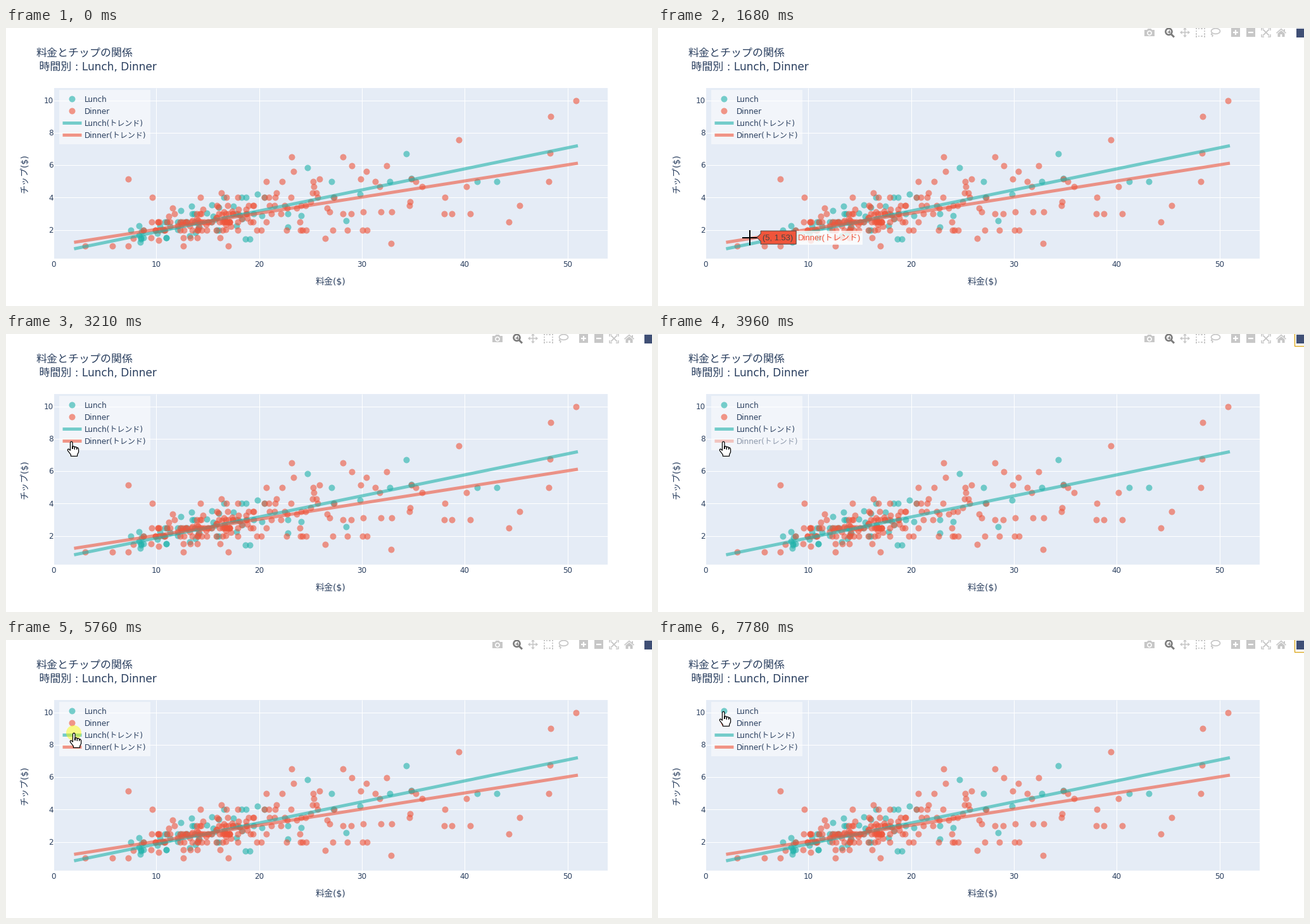
A matplotlib script that plays this animation: 1020x440 px, repeating every 8 s.

```python
import numpy as np
import matplotlib.pyplot as plt
from matplotlib.animation import FuncAnimation
from matplotlib.patches import Circle, Polygon, Rectangle

W, H, STEP, LOOP = 1020, 440, 50, 8000
DPI = 80
PT = 72 / DPI  # points per pixel
TEAL, RED, INK = "#20b2aa", "#ef553b", "#2a3f5f"
GREY, DARK = "#c7c7c7", "#7c7c7c"
SANS = ["DejaVu Sans", "Noto Sans CJK JP"]
ARIAL = ["Liberation Sans", "Noto Sans CJK JP"]

# Isolated points as tip: bills
DINNER = {
    1: [3.07, 5.75, 7.25, 12.6, 17], 1.17: [32.83], 1.47: [26.41, 7.74],
    2: [8.77, 30.46, 30.06, 28.55, 27.18, 24.55, 24.2, 24.01, 22.67, 20.23, 19.77, 17.9],
    2.5: [44.3, 23.95, 10.3, 20.7],
    3: [40.55, 38.73, 38.01, 28.97, 28.15, 22.12, 21.16],
    3.12: [32.9, 31.85, 30.14, 26.87], 3.35: [26.59, 23.68, 22.75, 11.61],
    3.52: [45.35, 34.63, 24.5, 24.06, 22.49, 21.5, 21, 19.49],
    3.72: [25, 34.65],
    4: [38.07, 27.28, 25.71, 23.1, 21.58, 20.53, 20.92, 17.9, 16.8, 14.31, 9.6],
    4.3: [25.56, 25.21, 21.7, 16.32], 4.68: [40.17, 35.83, 31.71, 25.29],
    5: [48.17, 35.26, 31.27, 25.28, 22.23, 20.69],
    5.14: [34.81, 29.9, 25.89, 7.25], 5.62: [30.4, 23.33], 5.96: [32.4, 29.03],
    6.5: [28.17, 23.17], 6.73: [48.27], 7.58: [39.42], 9: [48.33], 10: [50.81],
}
LUNCH = {
    1.42: [18.64, 19.08, 8.5], 2: [7.51], 2.18: [22.82], 2.56: [28.44],
    2.88: [24.08, 20.27], 3: [22.76, 19.44], 3.48: [13.42, 17.47],
    4: [27.2, 18.71, 18.3, 16.58, 20.53], 4.2: [29.8, 19.81],
    5: [43.11, 41.19, 32.68, 27.05], 5.17: [34.83], 5.85: [24.71], 6.7: [34.3],
}


def px(bill):
    return 75 + 16.235 * np.asarray(bill)


def py(tip):
    return 370.75 - 25.62 * np.asarray(tip)


def lunch_fit(bill):
    return 0.57 + 0.13 * bill


def dinner_fit(bill):
    return 1.03 + 0.0998 * bill


def points(table, fit, count, mean, low, high, seed):
    """Isolated points plus a dense cluster that favours half-dollar tips."""
    rng = np.random.default_rng(seed)
    bill = np.clip(rng.normal(mean, 3, count), low, high)
    bill += rng.uniform(0, 0.6, count)
    tip = fit(bill) + rng.normal(0, 0.45, count)
    tip = np.where(rng.random(count) < 0.6, np.round(tip * 2) / 2, tip)
    tip = np.clip(tip, 1.25, 3.7)
    fixed = [(b, t) for t, bills in table.items() for b in bills]
    return np.vstack([fixed, np.column_stack([bill, tip])])


fig = plt.figure(figsize=(W / DPI, H / DPI), dpi=DPI, facecolor="white")
ax = fig.add_axes([0, 0, 1, 1])
ax.set_xlim(0, W)
ax.set_ylim(H, 0)
ax.set_axis_off()


def text(x, y, s, size, color=INK, font=SANS, z=5, **kw):
    return ax.text(x, y, s, fontsize=size * PT, color=color, family=font,
                   zorder=z, va="baseline", **kw)


def line(xs, ys, color, width, z, alpha=1):
    return ax.plot(xs, ys, color=color, lw=width * PT, alpha=alpha, zorder=z,
                   solid_capstyle="butt")[0]


def rect(x0, y0, x1, y1, z, **kw):
    kw.setdefault("lw", 0)
    return ax.add_patch(Rectangle((x0, y0), x1 - x0, y1 - y0, zorder=z, **kw))


def dots(xs, ys, color, z):
    return ax.scatter(xs, ys, s=(10 * PT) ** 2, c=color, alpha=0.6, lw=0, zorder=z)


# Plot area, grid and labels
rect(75, 95, 950, 365, 0, fc="#e5ecf6")
for v in range(0, 51, 10):
    x = float(px(v))
    line([x, x], [95, 365], "white", 2 if v == 0 else 1, 1)
    text(x, 378, str(v), 12, ha="center")
for v in range(2, 11, 2):
    y = float(py(v))
    line([75, 950], [y, y], "white", 1, 1)
    text(74.5, y + 4.4, str(v), 12, ha="right")
text(47, 45, "料金とチップの関係", 17)
text(47, 67, " 時間別 : Lunch, Dinner", 17)
text(512.5, 406, "料金($)", 14, ha="center")
text(34, 230, "チップ($)", 14, ha="center", rotation=90, rotation_mode="anchor")

# Data
lunch = points(LUNCH, lunch_fit, 43, 12.8, 8.2, 17.8, 4)
dinner = points(DINNER, dinner_fit, 88, 14.6, 9.4, 19, 11)
for z, (data, color) in enumerate([(lunch, TEAL), (dinner, RED)]):
    dots(px(data[:, 0]), py(data[:, 1]), color, 2 + z / 10)
ends = np.array([2, 51])
trends = [line(px(ends), py(fit(ends)), color, 5, 3 + z / 10, 0.6)
          for z, (fit, color) in enumerate([(lunch_fit, TEAL), (dinner_fit, RED)])]

# Legend
rect(84, 98, 228, 184, 4, fc="white", alpha=0.5)
keys = []
for i, (name, color) in enumerate([("Lunch", TEAL), ("Dinner", RED),
                                   ("Lunch(トレンド)", TEAL), ("Dinner(トレンド)", RED)]):
    y = 112.3 + 19 * i
    label = text(124, y + 4.6, name, 12)
    if i < 2:
        dots([103.7], [y], color, 5)
    else:
        keys.append((line([89, 119], [y, y], color, 5, 5, 0.6), label))

# Mode bar
bar = []


def icon_poly(pts, color=GREY):
    bar.append(ax.add_patch(Polygon(pts, fc=color, lw=0, zorder=5)))


def icon_box(x0, y0, x1, y1, color=GREY):
    bar.append(rect(x0, y0, x1, y1, 5, fc=color))


def icon_line(xs, ys, color=GREY, width=2):
    bar.append(line(xs, ys, color, width, 5))


def icon_ring(x, y, r, color, width, fill="none"):
    bar.append(ax.add_patch(Circle((x, y), r, fc=fill, ec=color, lw=width * PT, zorder=5)))


icon_box(768, 3, 784, 13)
icon_poly([(772, 3), (773.5, 1), (778.5, 1), (780, 3)])
icon_ring(776, 8, 3.1, "white", 1.6, GREY)

icon_ring(806.5, 5.8, 5, DARK, 2.6)
icon_line([810, 815], [9.5, 14.5], DARK, 3)
icon_line([804, 809], [5.8, 5.8], DARK, 1.4)
icon_line([806.5, 806.5], [3.3, 8.3], DARK, 1.4)

icon_line([826, 838], [7, 7], width=1.5)
icon_line([832, 832], [1, 13], width=1.5)
for dx, dy in [(1, 0), (-1, 0), (0, 1), (0, -1)]:
    tip = np.array([832 + 8 * dx, 7 + 8 * dy])
    back = tip - 3.5 * np.array([dx, dy])
    side = 3 * np.array([dy, dx])
    icon_poly([tip, back + side, back - side])

for k in range(4):
    a = 849 + 4.2 * k
    b = a - 849
    for y in (0.8, 13.2):
        icon_line([a, a + 2.2], [y, y], width=1.7)
    for x in (849.8, 863):
        icon_line([x, x], [b, b + 2.2], width=1.7)

turn = np.linspace(0, 2 * np.pi, 30)
icon_line(880.5 + 7 * np.cos(turn), 5 + 4.3 * np.sin(turn), width=1.7)
icon_line([875, 873.5, 876, 875], [8, 10, 11.5, 14], width=1.7)

for x in (905, 929):
    icon_box(x, 0, x + 14, 14)
    icon_line([x + 3, x + 11], [7, 7], "white", 2.2)
icon_line([912, 912], [3, 11], "white", 2.2)

for sx in (-1, 1):
    for sy in (-1, 1):
        icon_line([960 + 3 * sx, 960 + 7.3 * sx, 960 + 7.3 * sx],
                  [7 + 7.3 * sy, 7 + 7.3 * sy, 7 + 3 * sy], width=1.5)
        icon_line([960, 960 + 5 * sx], [7, 7 + 5 * sy], width=1.8)

icon_poly([(976, 7.5), (984, 0.5), (992, 7.5), (991, 8.7), (984, 2.7), (977, 8.7)])
icon_poly([(978.5, 8.5), (984, 4), (989.5, 8.5), (989.5, 14), (985.5, 14),
           (985.5, 10), (982.5, 10), (982.5, 14), (978.5, 14)])
icon_box(988, 1.5, 990, 5)
icon_box(1008, 1, 1022, 15, "#3f4f75")
focus = rect(1004.5, -2, 1026, 18.5, 6, fc="none", ec="#dba514", lw=1.3 * PT)

# Hover label
LABEL = np.array([(0, 0), (6, -6), (6, -10.5), (62, -10.5), (62, 10.5), (6, 10.5), (6, 6)])
strip = rect(0, 0, 105, 22, 7, fc="white", alpha=0.8)
label = ax.add_patch(Polygon(LABEL, fc=RED, ec="#444", lw=PT, zorder=7.1))
value = text(0, 0, "", 13, "#444", ARIAL, 7.2)
series = text(0, 0, "Dinner(トレンド)", 13, RED, ARIAL, 7.2)
hover = [strip, label, value, series]

# Pointers
ARROW = np.array([(0, 0), (0, 16), (3.7, 12.6), (6.2, 18.3), (8.6, 17.2), (6.1, 11.7), (11.2, 11.4)])
HAND = np.array([(-1.5, 2), (-0.6, 0.4), (1.2, 0.4), (2, 2), (2, 12), (2, 8.2), (4.2, 7.6),
                 (5.4, 9), (5.4, 12.5), (5.4, 9), (7.5, 8.6), (8.6, 10), (8.6, 13), (8.6, 10),
                 (10.5, 10), (11.6, 12), (11.6, 17), (9.6, 21), (9.6, 23.4), (-0.6, 23.4),
                 (-0.6, 21), (-5.6, 14.4), (-5.6, 12.6), (-4, 12), (-1.5, 14.4)])
pointer = ax.add_patch(Polygon(ARROW, fc="white", ec="black", lw=1.2 * PT, zorder=9))
cross = [line([0], [0], "black", 2, 6.5) for _ in range(2)]
inverse = [line([0], [0], "#10aac4", 1.5, 8) for _ in range(2)]
press = ax.add_patch(Circle((0, 0), 12, fc="#ffff00", alpha=0.47, lw=0, zorder=8.5))

PATH = np.array([
    (790, 1, 362), (1000, 60, 347), (1190, 124, 331), (1260, 124, 331), (1540, 138, 331),
    (1740, 148, 332), (2030, 148, 332), (2110, 149, 285), (2250, 148, 208), (2320, 148, 208),
    (2600, 122, 192), (2820, 104, 178), (2890, 104, 176), (3200, 103, 170), (4930, 103, 170),
    (5150, 105, 157), (5360, 106, 144), (5545, 106, 144), (5560, 107, 147), (7030, 107, 147),
    (7300, 105, 125), (7520, 103, 113),
])
PRESSES = [(3440, 3630), (4410, 4630), (5760, 5960), (6550, 6660), (7560, 7750)]
HIDDEN = [(6220, 7020), (3960, 4900)]  # Lunch trend, Dinner trend
HOVERS = [(1130, 1290, 2), (1290, 1430, 3), (1430, 1650, 4), (1650, 2070, 5)]


def within(t, span):
    return span[0] <= t < span[1]


def show_hover(bill):
    for artist in hover:
        artist.set_visible(bill is not None)
    if bill is None:
        return
    tip = dinner_fit(bill)
    x, y = float(px(bill)), float(py(tip))
    label.set_xy(LABEL + (x, y))
    strip.set_xy((x + 62, y - 11))
    value.set_text(f"({bill}, {tip:.2f})")
    value.set_position((x + 9, y + 4.7))
    series.set_position((x + 65, y + 4.7))


def show_pointer(t, bill):
    x, y = (np.interp(t, PATH[:, 0], PATH[:, k]) for k in (1, 2))
    on_legend = 84 < x < 228 and y < 181
    crosshair = t >= 790 and x > 75 and not on_legend
    pointer.set_visible(t >= 790 and not crosshair)
    pointer.set_xy((HAND if on_legend else ARROW) + (x, y))
    arms = [([x - 12, x + 12], [y, y]), ([x, x], [y - 12, y + 12])]
    for arm, inv, (xs, ys) in zip(cross, inverse, arms):
        arm.set_visible(crosshair)
        arm.set_data(xs, ys)
        inv.set_visible(False)
        if crosshair and bill is not None:
            left, mid = float(px(bill)) + 6, float(py(dinner_fit(bill)))
            inv.set_visible(max(xs) > left)
            inv.set_data(np.clip(xs, left, left + 56), np.clip(ys, mid - 10, mid + 10))
    return x, y


def update(i):
    t = i * STEP + STEP / 2
    fade = float(np.clip((t - 800) / 300, 0, 1))
    for artist in bar:
        artist.set_alpha(fade)

    for trend, (key, name), span in zip(trends, keys, HIDDEN):
        off = within(t, span)
        trend.set_visible(not off)
        key.set_alpha(0.3 if off else 0.6)
        name.set_alpha(0.5 if off else 1)

    bill = next((b for a, z, b in HOVERS if a <= t < z), None)
    show_hover(bill)
    x, y = show_pointer(t, bill)

    pressed = any(within(t, span) for span in PRESSES)
    press.set_visible(pressed)
    press.center = (x, y)
    focus.set_visible(t >= PRESSES[0][1] and not pressed)
    return []


anim = FuncAnimation(fig, update, frames=LOOP // STEP, interval=STEP,
                     init_func=lambda: update(0), repeat=True, repeat_delay=0)
plt.show()
```
